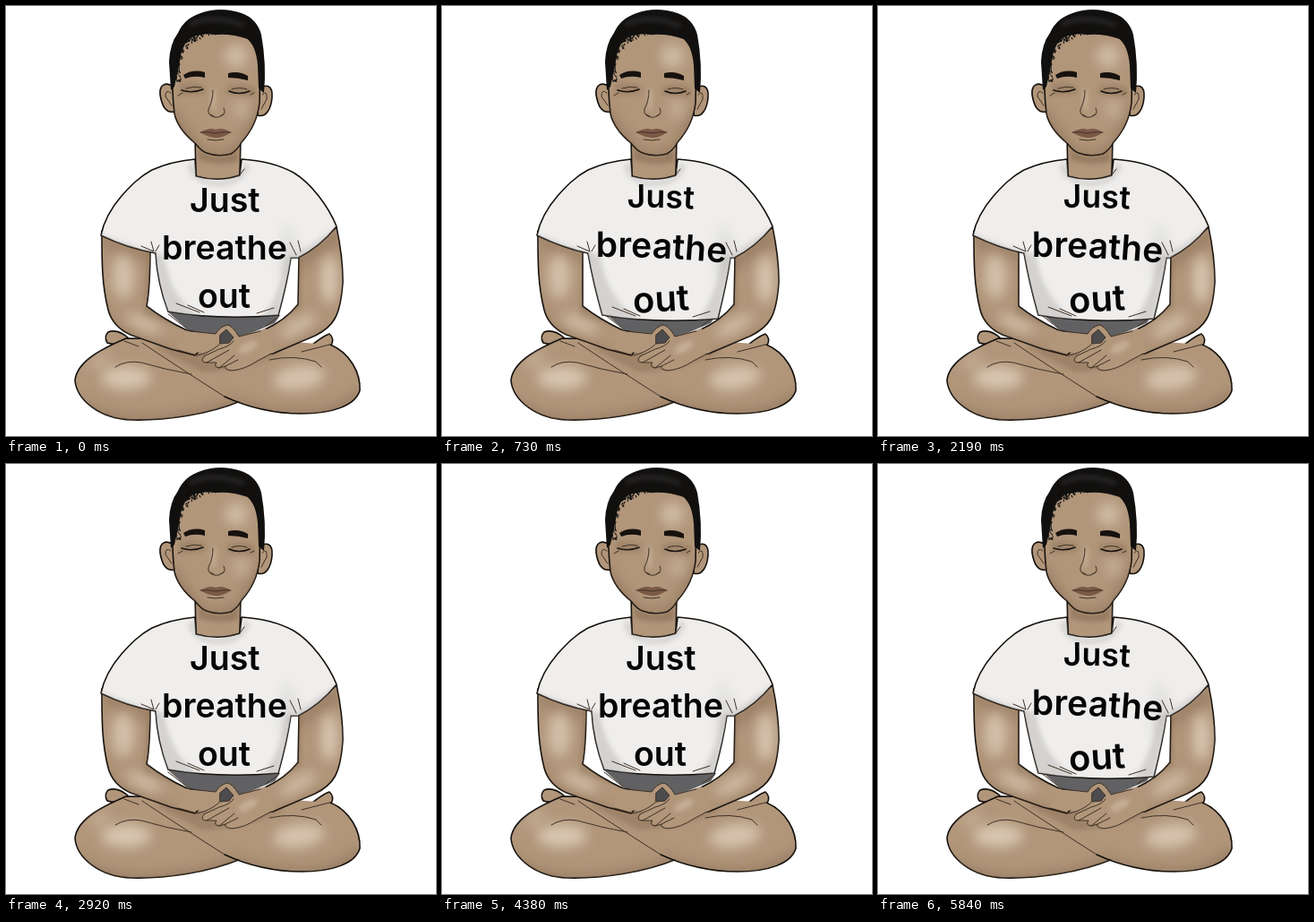
An HTML page that plays this animation: 480 by 480 pixels, repeating every 6.57 s.

```html
<!DOCTYPE html>
<html lang="en">
<head>
<meta charset="utf-8">
<title>Just breathe out</title>
<style>
html, body { margin: 0; width: 100%; height: 100%; overflow: hidden; background: #fff; }
svg { display: block; width: 100vw; height: 100vh; }
text { font-family: Inter, "Liberation Sans", sans-serif; font-weight: 600; fill: #050505; }
.ink { stroke: #14100c; stroke-width: 1.6; stroke-linejoin: round; stroke-linecap: round; }
.thin { fill: none; stroke: #3f3125; stroke-width: 1; stroke-linecap: round; stroke-linejoin: round; }
.skin { fill: #b1967a; }
.shade { fill: #82684f; }
.light { fill: #dccbb7; }
</style>
</head>
<body>
<svg viewBox="0 0 480 480" xmlns="http://www.w3.org/2000/svg">
  <defs>
    <filter id="soft" x="-80%" y="-80%" width="260%" height="260%"><feGaussianBlur stdDeviation="7"/></filter>
    <filter id="blur" x="-60%" y="-60%" width="220%" height="220%"><feGaussianBlur stdDeviation="2.5"/></filter>
    <clipPath id="faceClip"><use href="#face"/></clipPath>
    <clipPath id="legLClip"><use href="#legL"/></clipPath>
    <clipPath id="legRClip"><use href="#legR"/></clipPath>
    <clipPath id="armLClip"><path id="armLCut"/></clipPath>
    <clipPath id="armRClip"><path id="armRCut"/></clipPath>
    <clipPath id="shirtClip"><path id="shirtCut"/></clipPath>
  </defs>

  <!-- legs -->
  <path class="skin ink" d="M136 370Q124 360 114 364Q109 369 113 376Q122 379 136 376Z"/>
  <path class="skin ink" d="M335 384Q352 369 361 366Q367 371 363 379Q352 386 335 388Z"/>
  <path id="legL" class="skin ink" d="M134 371C113 380 79 395 77 418C79 440 105 461 140 462C178 463 226 456 262 441L284 414L232 372Z"/>
  <g clip-path="url(#legLClip)">
    <path class="shade" filter="url(#soft)" opacity=".5" d="M74 430Q100 457 150 458Q212 457 270 433L262 472H90Z"/>
    <ellipse class="light" cx="134" cy="415" rx="28" ry="13" filter="url(#soft)" opacity=".9"/>
    <ellipse class="light" cx="104" cy="396" rx="14" ry="8" transform="rotate(-30 104 396)" filter="url(#soft)" opacity=".4"/>
  </g>
  <path id="legR" class="skin" d="M152 376C174 391 199 407 219 420C246 438 283 455 330 455C365 455 390 446 395 429C396 410 384 387 362 378L278 372L190 372Z"/>
  <g clip-path="url(#legRClip)">
    <path class="shade" filter="url(#soft)" opacity=".5" d="M238 430Q292 455 340 450Q377 447 397 424L402 468H278Z"/>
    <ellipse class="light" cx="327" cy="415" rx="29" ry="13" transform="rotate(-8 327 415)" filter="url(#soft)" opacity=".85"/>
    <path class="shade" filter="url(#blur)" opacity=".4" d="M165 380L218 408Q259 409 312 386L240 374Z"/>
  </g>
  <path class="ink" fill="none" d="M244 436Q285 455 330 455C365 455 390 446 395 429C396 410 384 387 362 378"/>
  <path class="thin" d="M152 376C174 391 199 407 219 420L244 436M122 403Q134 395 151 398Q178 406 207 411M294 395Q322 389 346 397L352 403M132 374L148 380M330 386L361 378"/>

  <path fill="#616163" d="M180 341L306 345L300 354L260 371L238 371L205 363Z"/>
  <path class="thin" d="M181 344L203 361M304 347L290 357"/>

  <!-- arms -->
  <path id="armL" class="skin ink"/>
  <g clip-path="url(#armLClip)">
    <path class="shade" filter="url(#soft)" opacity=".55" d="M101 254L170 276L165 285L110 268ZM102 318L118 355L210 396L190 402L105 366Z"/>
    <path class="shade" filter="url(#blur)" opacity=".4" d="M158 272H168L162 340L208 361L154 346Z"/>
    <ellipse class="light" cx="131" cy="302" rx="12" ry="25" filter="url(#soft)" opacity=".8"/>
    <ellipse class="light" cx="154" cy="355" rx="22" ry="7" transform="rotate(25 154 355)" filter="url(#soft)" opacity=".75"/>
  </g>
  <path id="armR" class="skin ink"/>
  <g clip-path="url(#armRClip)">
    <path class="shade" filter="url(#soft)" opacity=".55" d="M319 283L373 246L374 262L324 294ZM383 318L366 357L289 397L345 397Z"/>
    <path class="shade" filter="url(#blur)" opacity=".4" d="M320 277H329L329 337L280 364L321 331Z"/>
    <ellipse class="light" cx="361" cy="305" rx="9" ry="27" filter="url(#soft)" opacity=".95"/>
    <ellipse class="light" cx="326" cy="357" rx="23" ry="7" transform="rotate(-29 326 357)" filter="url(#soft)" opacity=".75"/>
  </g>

  <!-- hands -->
  <path class="skin" d="M196 362L234 366Q239 358 247 356Q253 357 260 369L290 360L300 386L266 404Q251 409 245 402Q235 405 234 398Q218 400 219 393L226 388L192 384Z"/>
  <path class="thin" stroke-width="1.4" d="M205 363L234 366Q239 358 247 356Q253 357 260 369L284 363M192 384L213 390Q226 388 238 378M254 374Q250 380 238 383L221 391Q216 398 224 398L249 384M224 398L235 398Q231 403 238 404L255 390M238 404L245 402Q243 406 252 407Q266 406 281 396L296 388M245 402L259 395"/>
  <path fill="#4c4c4e" class="thin" d="M239 367L246 361L254 370L249 376L239 377Z" style="fill:#4c4c4e"/>
  <ellipse class="light" cx="270" cy="381" rx="12" ry="5" transform="rotate(-28 270 381)" filter="url(#blur)" opacity=".45"/>

  <!-- neck and shirt -->
  <path class="skin ink" d="M211 145L212 190Q237 199 261 189L262 146Z"/>
  <path class="shade" filter="url(#blur)" opacity=".55" d="M214 157Q237 178 260 158L259 174Q238 179 215 172Z"/>
  <path id="shirt" class="ink" fill="#efeeed"/>
  <g clip-path="url(#shirtClip)" fill="#bebcb9">
    <path id="sideShade" filter="url(#blur)" opacity=".55"/>
    <path filter="url(#blur)" opacity=".5" d="M101 253L166 276L166 283L106 264ZM319 281L374 243L374 255L325 290ZM208 173Q217 198 240 195Q262 193 267 173L272 180Q264 200 239 201Q210 201 203 180Z"/>
    <path filter="url(#soft)" opacity=".4" d="M312 240L329 281L320 304L306 300Z"/>
  </g>
  <path id="folds" class="thin"/>
  <path class="thin" d="M266 182L260 190M151 268L165 274L162 263M167 274L171 267M324 278L317 264M329 274L326 262"/>

  <!-- head -->
  <path class="skin ink" d="M187 90C178 84 171 88 172 99C174 111 178 120 188 118Z"/>
  <path class="skin ink" d="M282 93C291 86 298 89 297 102C296 115 290 125 281 122Z"/>
  <path class="thin" d="M184 97Q178 92 178 101L185 111M286 99Q292 93 291 104L285 115"/>
  <path id="face" class="skin ink" d="M187 62C185 82 186 103 188 120C191 134 200 144 211 153Q218 162 224 164Q237 169 251 165Q259 160 263 152C273 141 281 126 283 108L284 61Q274 25 235 21Q195 25 187 62Z"/>
  <g clip-path="url(#faceClip)">
    <path class="shade" filter="url(#soft)" opacity=".5" d="M180 100L194 126L221 160Q239 166 258 156L290 95L290 173H180Z"/>
    <ellipse class="light" cx="257" cy="56" rx="13" ry="13" filter="url(#soft)" opacity=".7"/>
    <ellipse class="light" cx="263" cy="115" rx="9" ry="11" filter="url(#soft)" opacity=".45"/>
    <ellipse class="light" cx="232" cy="104" rx="3" ry="13" filter="url(#blur)" opacity=".4"/>
    <path class="shade" filter="url(#blur)" opacity=".35" d="M193 87Q207 83 222 89L222 98L194 100ZM246 90Q263 84 278 91L277 102L246 99Z"/>
  </g>
  <path fill="#11100f" d="M184 94L182 62Q183 42 192 30Q199 14 217 8Q239 0 263 8Q280 14 285 32Q291 65 288 97L282 92L281 66Q279 45 270 37Q253 31 235 32Q214 29 203 38Q195 48 194 62L188 90Z"/>
  <path d="M205 21Q230 8 266 22" fill="none" stroke="#4b4948" stroke-width="5" opacity=".4" filter="url(#blur)"/>
  <g id="hair" stroke="#11100f" stroke-width="1.2" stroke-linecap="round"></g>
  <path fill="#17120e" d="M198 77Q209 70 222 74L222 80Q210 77 200 81ZM248 75Q260 72 270 78L270 83Q259 80 248 80Z"/>
  <path class="thin" style="stroke:#17120e;stroke-width:1.6" d="M196 94Q208 98 220 93M249 95Q260 100 272 95"/>
  <path class="thin" d="M201 92Q210 89 218 91M252 93Q261 90 269 93M192 100L197 97M273 99L277 97M231 94Q231 106 226 115Q225 121 230 123Q236 126 241 122Q246 120 243 114M228 121L232 123M239 123L243 121"/>
  <path fill="#7b5947" d="M217 141Q227 135 234 138Q242 135 251 141Q242 148 233 147Q224 146 217 141Z"/>
  <path class="thin" d="M217 141Q226 140 234 142Q243 140 251 141M225 149Q234 151 243 149"/>

  <g id="calm">
    <text x="205" y="229.5" font-size="37.5">Just</text>
    <text x="174" y="283" font-size="37.5">breathe</text>
    <text x="214" y="336.5" font-size="37.5">out</text>
  </g>
  <g id="full">
    <path id="line1" fill="none" d="M207 225Q244 224 300 228"/>
    <path id="line2" fill="none" d="M172 280Q245 279 340 289"/>
    <path id="line3" fill="none" d="M214 343Q245 341 300 338"/>
    <text font-size="35.5"><textPath href="#line1">Just</textPath></text>
    <text font-size="39"><textPath href="#line2">breathe</textPath></text>
    <text font-size="40"><textPath href="#line3">out</textPath></text>
  </g>
</svg>
<script>
const BEAT = 730, LOOP = 9 * BEAT;
const el = id => document.getElementById(id);
const setPath = (id, d) => el(id).setAttribute("d", d);
const setBoth = (id, d) => { setPath(id, d); setPath(id + "Cut", d); };

// Short curls soften the left hairline and the crown.
function growHair() {
  let seed = 17, d = "";
  const rnd = () => (seed = seed * 16807 % 2147483647) / 2147483647;
  for (let i = 0; i < 170; i++) {
    const a = Math.PI * (0.9 + rnd() * 0.65), r = 0.9 + rnd() * 0.2;
    const x = 237 + Math.cos(a) * 48 * r, y = 70 + Math.sin(a) * 44 * r;
    d += `M${x.toFixed(1)} ${y.toFixed(1)}l${(rnd() * 3 - 1.5).toFixed(1)} 1.5`;
  }
  el("hair").innerHTML = `<path fill="none" d="${d}"/>`;
}

function pose(full) {
  const w = full ? 4 : 0, h = full ? 4 : 0;
  setBoth("armL", `M107 251C107 286 107 311 114 339Q119 358 139 367L184 383L211 390L232 368L202 362Q176 350 157 335Q${161 - w} 314 ${161 - w} 268Z`);
  setBoth("armR", `M369 247Q376 280 376 308Q374 337 367 349Q361 360 345 368L298 388L275 391L261 370L287 362Q312 351 326 333L327 279Z`);
  setBoth("shirt", `M211 171C190 173 174 178 163 183C148 191 138 202 129 212C116 227 109 241 106 256Q135 270 ${167 - w} 276Q169 310 ${181 - w / 2} ${341 + h}Q239 ${351 + h} ${304 + w} ${345 + h}Q${314 + w} 309 ${318 + w} 281L326 281Q350 269 369 246C360 224 341 198 321 186Q297 173 263 171L261 189Q237 197 212 190Z`);
  setPath("sideShade", `M${164 - w} 276L${177 - w} ${344 + h}L${222 + w} ${350 + h}Q184 330 176 277ZM${321 + w} 278L${305 + w} ${347 + h}L284 ${348 + h}Q304 331 312 280Z`);
  setPath("folds", `M190 ${332 + h}L216 ${342 + h}M203 ${334 + h}L221 ${342 + h}M280 ${343 + h}L299 ${337 + h}`);
  el("calm").style.display = full ? "none" : "";
  el("full").style.display = full ? "" : "none";
}

const start = performance.now();
let last;
function tick(now) {
  const beat = Math.floor(Math.max(0, now - start) % LOOP / BEAT);
  // The seventh breath rests for two beats.
  const full = beat === 8 || (beat < 6 && beat % 2 === 1);
  if (full !== last) pose(last = full);
  requestAnimationFrame(tick);
}
growHair();
tick(start);
</script>
</body>
</html>
```
